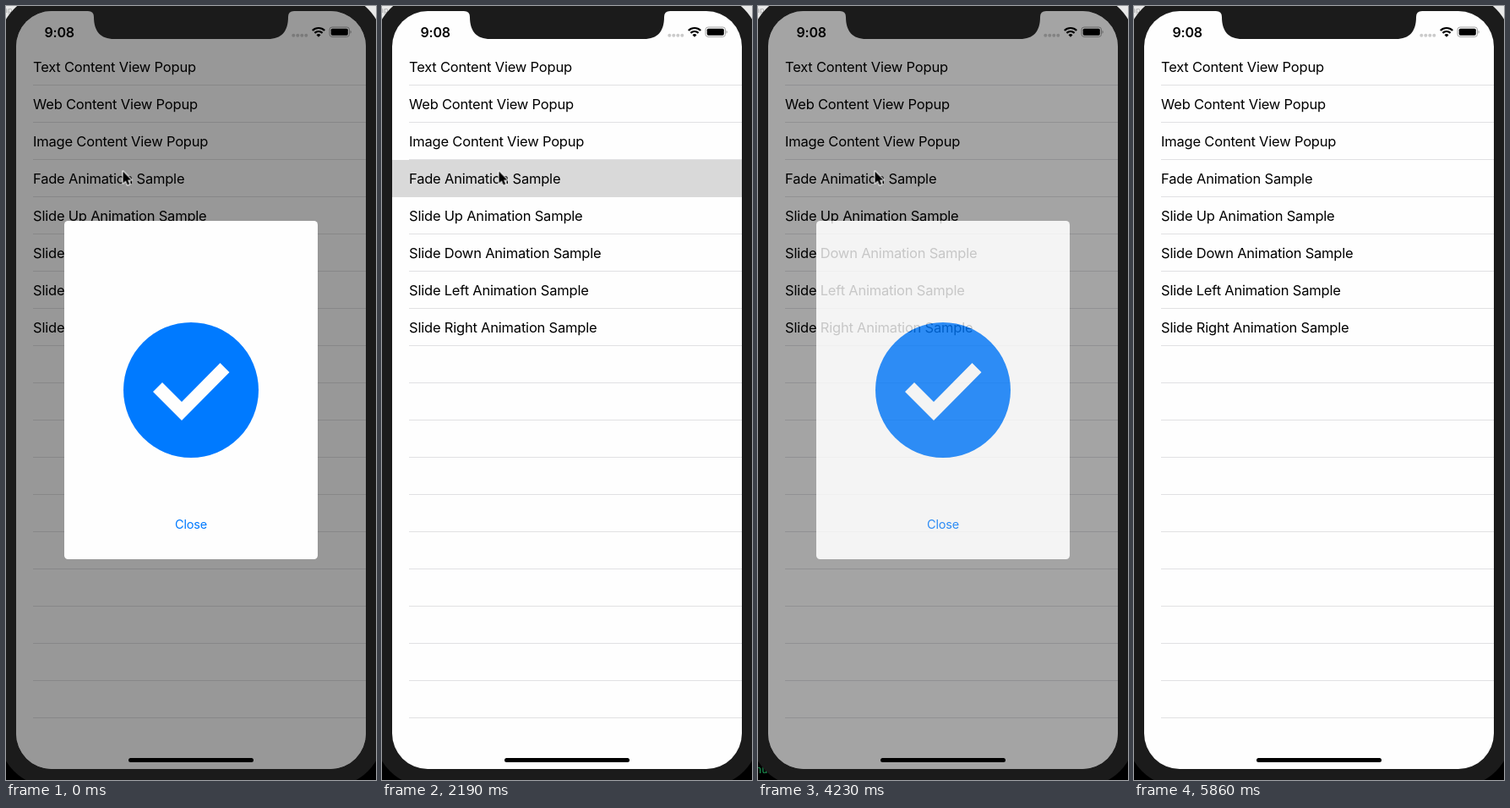
An HTML page that plays this animation: 438 px wide and 915 px high, repeating every 6290 ms.

```html
<!DOCTYPE html>
<html lang="en">
<head>
<meta charset="utf-8">
<title>Popup fade</title>
<style>
  html, body { margin: 0; width: 100%; height: 100%; overflow: hidden; background: #000; }
  svg { display: block; width: 438px; height: 915px; font-family: Inter, Roboto, sans-serif; }
  .rows { font-size: 16.5px; letter-spacing: -.2px; }
  .clock { font-size: 16px; font-weight: 600; letter-spacing: -.2px; }
  .close { font-size: 14.5px; letter-spacing: -.2px; text-anchor: middle; }
  .console { font: 12px "DejaVu Sans Mono", monospace; }

  .fade, .highlight, .console { animation: fade 6290ms step-end infinite; }
  .highlight { animation-name: highlight; }
  .console { animation-name: console; }
  .cursor { animation: move 6290ms step-end infinite; }

  @keyframes fade {
    0% { opacity: 1; }
    15.738% { opacity: .77; }
    17.646% { opacity: .2; }
    19.554% { opacity: 0; }
    36.724% { opacity: .2; }
    38.473% { opacity: .75; }
    40.063% { opacity: 1; }
    67.249% { opacity: .89; }
    69.156% { opacity: .36; }
    71.064%, 100% { opacity: 0; }
  }
  @keyframes highlight {
    0% { opacity: 0; }
    34.816% { opacity: 1; }
    36.724% { opacity: .8; }
    38.473% { opacity: .25; }
    40.063%, 100% { opacity: 0; }
  }
  @keyframes console {
    0% { opacity: 0; }
    40.063% { opacity: 1; }
    71.064%, 100% { opacity: 0; }
  }
  @keyframes move {
    0% { transform: translate(138.5px, 195.5px); }
    76.152% { transform: translate(138.5px, 195.5px); animation-timing-function: steps(3, jump-both); }
    79.49% { transform: translate(244.5px, 655px); }
    83.306% { transform: translate(244.5px, 655px); animation-timing-function: steps(10, jump-both); }
    93.163%, 100% { transform: translate(426px, 927px); }
  }
</style>
</head>
<body>
<svg viewBox="0 0 438 915">
  <defs>
    <clipPath id="screen"><rect x="12" y="6" width="414" height="896" rx="42"/></clipPath>
    <pattern id="lines" y="93" width="438" height="44" patternUnits="userSpaceOnUse">
      <rect width="438" height="1" fill="#e1e1e3"/>
    </pattern>
  </defs>

  <!-- desktop behind the phone -->
  <rect width="438" height="450" fill="#e9e9e9"/>
  <text x="-3" y="8" font-size="9" fill="#aaa">ap</text>
  <text class="console" x="-3" y="907" fill="#1fa05a">nu</text>
  <rect x="-9" y="-15" width="456" height="938" rx="63" fill="#1b1b1b"/>

  <g clip-path="url(#screen)">
    <rect x="12" y="6" width="414" height="896" fill="#fefefe"/>
    <rect x="32" y="93" width="394" height="749" fill="url(#lines)"/>
    <rect class="highlight" x="12" y="182" width="414" height="44" fill="#d9d9d9"/>
    <g class="rows">
      <text x="32" y="78">Text Content View Popup</text>
      <text x="32" y="122">Web Content View Popup</text>
      <text x="32" y="166">Image Content View Popup</text>
      <text x="32" y="210">Fade Animation Sample</text>
      <text x="32" y="254">Slide Up Animation Sample</text>
      <text x="32" y="298">Slide Down Animation Sample</text>
      <text x="32" y="342">Slide Left Animation Sample</text>
      <text x="32" y="386">Slide Right Animation Sample</text>
    </g>

    <!-- status bar -->
    <text class="clock" x="45.5" y="36.5">9:08</text>
    <g fill="#cbcbcb">
      <circle cx="340.3" cy="34.8" r="2"/>
      <circle cx="345.3" cy="34.8" r="2"/>
      <circle cx="350.3" cy="34.8" r="2"/>
      <circle cx="355.3" cy="34.8" r="2"/>
    </g>
    <g fill="none" stroke="#000" stroke-width="2.2">
      <path d="M362.8 29A10.2 10.2 0 0 1 377.2 29"/>
      <path d="M365.4 31.9A6.5 6.5 0 0 1 374.6 31.9"/>
    </g>
    <path d="M370 36.8L367.5 34.3A3.5 3.5 0 0 1 372.5 34.3Z"/>
    <rect x="383" y="25" width="23.5" height="11.4" rx="3" fill="none" stroke="#a3a3a3"/>
    <rect x="384.7" y="26.7" width="20.1" height="8" rx="1.6"/>
    <path d="M407.5 28.8a2.2 2.2 0 0 1 0 4Z" fill="#a3a3a3"/>

    <!-- dimmed backdrop and popup fade together, the popup inside the backdrop -->
    <g class="fade">
      <rect x="12" y="6" width="414" height="896" fill-opacity=".4"/>
      <g class="fade">
        <rect x="69" y="254" width="300" height="400" rx="4.5" fill="#fefefe"/>
        <circle cx="219" cy="454" r="80" fill="#007aff"/>
        <path d="M174 456L185 445L208 468L253.5 422L264.5 433L208 490Z" fill="#fefefe"/>
        <text class="close" x="219" y="617.5" fill="#007aff">Close</text>
      </g>
    </g>
    <rect x="145" y="889" width="148" height="5" rx="2.5"/>
  </g>

  <path d="M97 4V6Q104 6 104 13C104 30 112 39 128 39H310C326 39 334 30 334 13Q334 6 341 6V4Z" fill="#1b1b1b"/>

  <path class="cursor" d="M0 0V14L3.2 11L5.4 16L7.8 15L5.6 10.2H10Z"
        stroke="#fff" stroke-width="2" stroke-linejoin="round" paint-order="stroke"/>
</svg>
</body>
</html>
```
